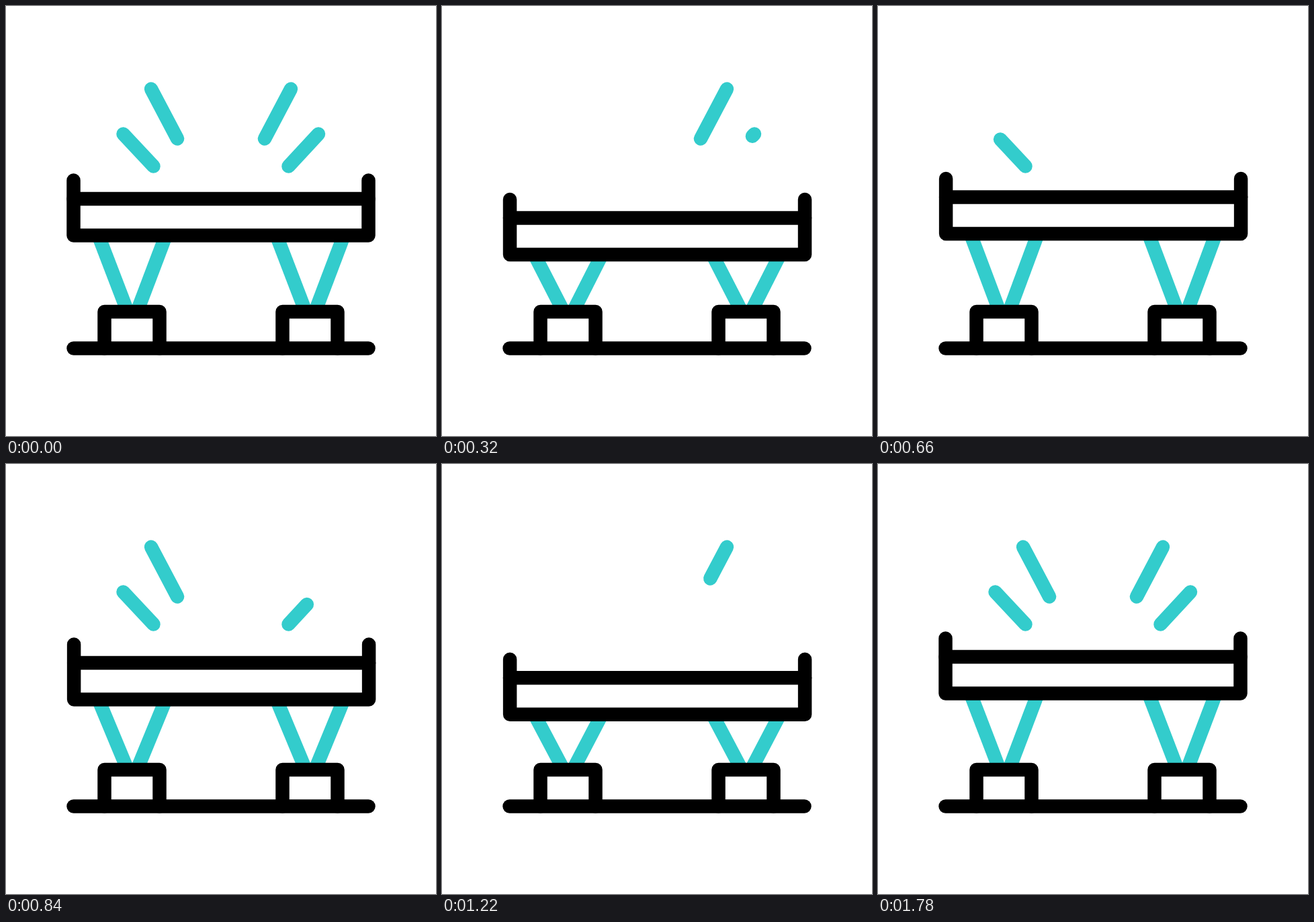
Write an HTML page with a canvas that moves like this. It is 640x640 px and loops after 2400 ms.

```html
<!DOCTYPE html>
<html>
<head>
<meta charset="utf-8">
<style>
html, body { margin: 0; width: 100%; height: 100%; overflow: hidden; background: #fff; }
canvas { display: block; }
</style>
</head>
<body>
<canvas id="stage" width="640" height="640"></canvas>
<script>
const ctx = document.getElementById('stage').getContext('2d');
const LOOP = 2400, STEP = 20, LAST = 89;
const TEAL = '#33cccc';

// Beam height keys: [step, offset, ease into this key]
const easeOut = power => p => 1 - (1 - p) ** power;
const smooth = p => p * p * (3 - 2 * p);
const beamKeys = [
  [0, 0],
  [25, 34, easeOut(1.8)],
  [33, -2.5, smooth],
  [64, 34, easeOut(1.1)],
  [72, -2.5, smooth],
  [LAST, 0, smooth]
];

// Rays in the order they vanish and return: inner x, y, outer x, y
const rays = [
  [219.5, 238.5, 174.5, 190.5],
  [255, 197.5, 216, 123.5],
  [420.5, 238.5, 465, 190.5],
  [385, 197.5, 424, 123.5]
];
const RAY_TIME = 5.05;
const cycles = [{ hide: 1.2, show: 28.8 }, { hide: 44, show: 63.8 }];

const clamp = v => Math.max(0, Math.min(1, v));
const mix = (a, b, p) => a + (b - a) * p;

function beamOffset(step) {
  const i = Math.max(1, beamKeys.findIndex(k => k[0] >= step));
  const [t0, y0] = beamKeys[i - 1], [t1, y1, ease] = beamKeys[i];
  return mix(y0, y1, ease((step - t0) / (t1 - t0)));
}

function line(color, cap, ...points) {
  ctx.strokeStyle = color;
  ctx.lineCap = cap;
  ctx.beginPath();
  for (let i = 0; i < points.length; i += 2) ctx.lineTo(points[i], points[i + 1]);
  ctx.stroke();
}

function drawRay([x0, y0, x1, y1], index, step) {
  const progress = start => clamp((step - start) / RAY_TIME - index);
  let from = 0, to = 1;
  for (const { hide, show } of cycles) {
    if (progress(hide) > 0) from = progress(hide);
    if (from === 1 && progress(show) > 0) {
      from = 0;
      to = progress(show);
    }
  }
  if (from < to) {
    line(TEAL, 'round', mix(x0, x1, from), mix(y0, y1, from), mix(x0, x1, to), mix(y0, y1, to));
  }
}

function draw(step) {
  ctx.fillStyle = '#fff';
  ctx.fillRect(0, 0, 640, 640);
  ctx.lineWidth = 20.5;
  ctx.lineJoin = 'round';

  rays.forEach((ray, i) => drawRay(ray, i, step));

  const dy = beamOffset(step);
  const dx = 0.6 * Math.min(clamp(step / 18), clamp((LAST - step) / 17));
  const top = 287 + dy, bottom = 341.5 + dy;
  const left = 100.5 + dx, right = 539.5 + dx;

  for (const x of [0, 265]) {
    line(TEAL, 'butt', x + 137.5, bottom, x + 181, 455);
    line(TEAL, 'butt', x + 238, bottom, x + 195, 455);
    line('#000', 'round', x + 146.5, 509.5, x + 146.5, 455, x + 228.5, 455, x + 228.5, 509.5);
  }
  line('#000', 'round', 100.5, 509.5, 539.5, 509.5);
  line('#000', 'round', left, 259.5 + dy, left, bottom, right, bottom, right, 259.5 + dy);
  line('#000', 'round', left, top, right, top);
}

function tick() {
  draw(Math.min(LAST, Math.floor(performance.now() % LOOP / STEP)));
  requestAnimationFrame(tick);
}
tick();
</script>
</body>
</html>
```
